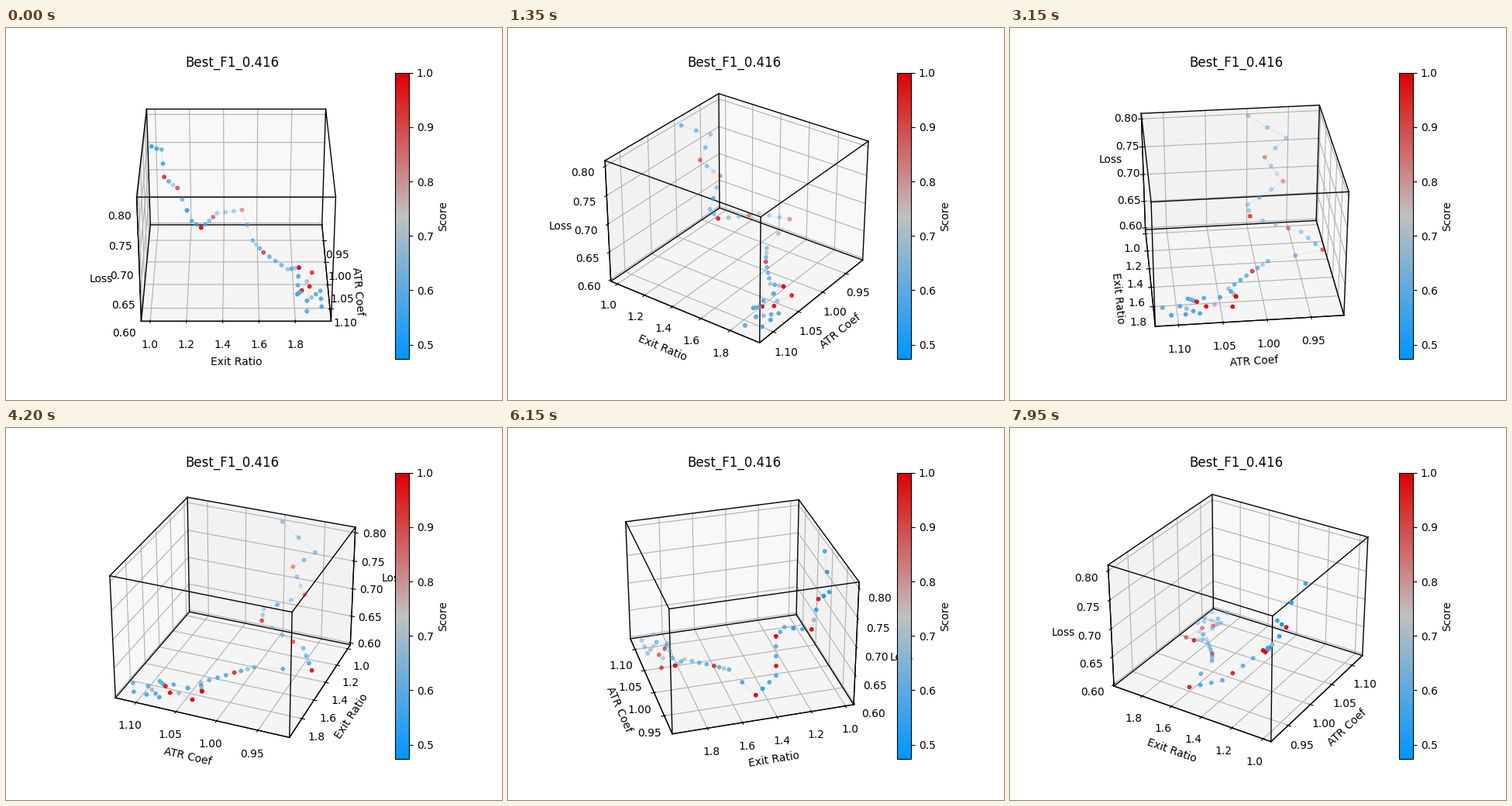
Recreate the animation shown at these times as a matplotlib script. Size 640 by 480 pixels, loop 8 s.

```python
from itertools import combinations, product

import matplotlib.pyplot as plt
import numpy as np
from matplotlib.animation import FuncAnimation
from matplotlib.colors import LinearSegmentedColormap

INTERVAL = 50        # ms per animation tick
TICKS_PER_TURN = 3   # the camera jumps every third tick
DEGREES_PER_TURN = 4
TICKS = 160

TRIALS = 49
BEST = [4, 7, 12, 15, 19, 24, 31, 37, 39, 40]   # trials with a full score
MIDDLING = [6, 22, 28, 30, 38, 42]
REPEATED = [9, 12, 31, 32, 41]                  # trials that were run twice

# Turning points of the search path: trial number, coef and ratio,
# both measured from the centre of the plot box.
TURNS = np.array([
    (0, -0.11, -0.54), (2, -0.36, -0.49), (4, -0.215, -0.47),
    (7, -0.33, -0.39), (10, -0.08, -0.29), (12, -0.09, -0.23),
    (16, -0.42, -0.13), (19, -0.54, 0.04), (21, -0.17, 0.11),
    (24, -0.06, 0.18), (28, 0.11, 0.335), (31, 0.07, 0.41),
    (34, 0.375, 0.39), (37, 0.32, 0.42), (39, 0.10, 0.495),
    (41, 0.43, 0.45), (44, 0.31, 0.54), (46, 0.49, 0.54), (47, 0.54, 0.445)])

CENTRE = np.array([1.0194, 1.474, 0.703])
SCALE = np.array([0.1795, 0.8795, 0.2386])
HALF_BOX = np.array([0.5952, 0.5952, 0.4464])

trial = np.arange(TRIALS)
coef, ratio = (np.interp(trial, TURNS[:, 0], column) for column in TURNS.T[1:])
loss = -0.415 + 0.835 * np.exp(-trial / 9.8)
points = CENTRE + SCALE * np.column_stack([coef, ratio, loss])
low, high = CENTRE - SCALE * HALF_BOX, CENTRE + SCALE * HALF_BOX

rng = np.random.default_rng(4)
score = 0.51 + 0.08 * trial / TRIALS + rng.uniform(-0.02, 0.04, TRIALS)
score[MIDDLING] = 0.69
score[BEST] = 1.0

fig = plt.figure(figsize=(6.4, 4.8), dpi=100)
ax = fig.add_subplot(projection="3d")
cmap = LinearSegmentedColormap.from_list("score", ["#0096ff", "silver", "#e00000"])

order = np.r_[trial, REPEATED]
dots = ax.scatter(*points[order].T, c=score[order], cmap=cmap, s=10,
                  vmin=0.4736, vmax=1.0)
ax.plot(*points.T, color="gray", alpha=0.15, linewidth=0.7)

# Outline every edge of the box: corner pairs that differ in one axis only.
for a, b in combinations(product((0, 1), repeat=3), 2):
    if sum(i != j for i, j in zip(a, b)) == 1:
        ends = np.where([a, b], high, low)
        ax.plot(*ends.T, color="black", linewidth=1, snap=False)

ax.set_xlim(low[0], high[0])
ax.set_ylim(low[1], high[1])
ax.set_zlim(low[2], high[2])
ax.set_xlabel("ATR Coef")
ax.set_ylabel("Exit Ratio")
ax.set_zlabel("Loss")
ax.set_title("Best_F1_0.416")
fig.colorbar(dots, label="Score")


def update(tick):
    ax.view_init(elev=30, azim=DEGREES_PER_TURN * (tick // TICKS_PER_TURN))
    return ()


anim = FuncAnimation(fig, update, frames=TICKS, interval=INTERVAL,
                     repeat=True, repeat_delay=0)
plt.show()
```
